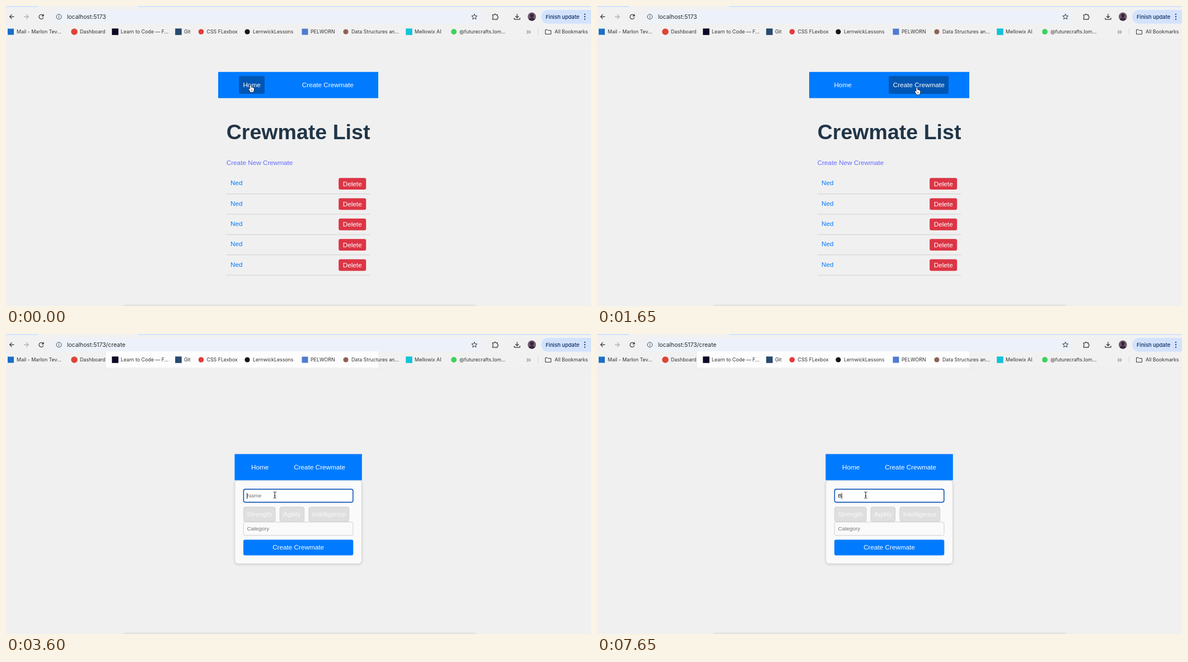
An HTML page with a canvas that plays this animation: 1045 px wide and 536 px high, repeating every 8 s.

```html
<!DOCTYPE html>
<html lang="en">
<head>
<meta charset="utf-8">
<title>Crewmate List</title>
<style>
html, body { margin: 0; width: 100%; height: 100%; overflow: hidden; background: #f0f0f0; }
canvas { display: block; width: 1045px; height: 536px; }
</style>
</head>
<body>
<canvas id="stage"></canvas>
<script>
const W = 1045, H = 536, LOOP = 8000;
const PAGE = '"Liberation Sans", Arial, sans-serif';
const UI = 'Inter, Roboto, sans-serif';
const BLUE = '#007bff', BASE = 11.74, SMALL = 9.78;

const canvas = document.getElementById('stage');
const dpr = window.devicePixelRatio || 1;
canvas.width = W * dpr;
canvas.height = H * dpr;
const ctx = canvas.getContext('2d');

function text(str, x, y, size, color, { font = PAGE, weight = 400, align = 'left' } = {}) {
  ctx.font = `${weight} ${size}px ${font}`;
  ctx.textAlign = align;
  ctx.fillStyle = color;
  ctx.fillText(str, x, y);
}

function rect(x, y, w, h, color) {
  ctx.fillStyle = color;
  ctx.fillRect(x, y, w, h);
}

function box(x, y, w, h, r, fill, stroke, lw = 0.8) {
  ctx.beginPath();
  ctx.roundRect(x, y, w, h, r);
  if (fill) { ctx.fillStyle = fill; ctx.fill(); }
  if (stroke) { ctx.strokeStyle = stroke; ctx.lineWidth = lw; ctx.stroke(); }
}

function disc(x, y, r, color) {
  ctx.beginPath();
  ctx.arc(x, y, r, 0, 7);
  ctx.fillStyle = color;
  ctx.fill();
}

// Stroke an SVG path placed at (x, y)
function line(d, x, y, color = '#333', lw = 1.2, fill) {
  const p = new Path2D(d);
  ctx.save();
  ctx.translate(x, y);
  ctx.lineJoin = 'round';
  ctx.strokeStyle = color;
  ctx.lineWidth = lw;
  ctx.stroke(p);
  if (fill) { ctx.fillStyle = fill; ctx.fill(p); }
  ctx.restore();
}

// label, text x, icon shape, icon centre, icon half size, colour
const bookmarks = [
  ['Mail - Marlon Tev...', 19, 'sq', 8.5, 5.5, '#1a6fc4'],
  ['Dashboard', 132, 'o', 122, 5.8, '#dc4437'],
  ['Learn to Code — F...', 205, 'sq', 195, 5.8, '#0a0a23'],
  ['Git', 318, 'sq', 308, 5.8, '#29496f'],
  ['CSS FLexbox', 358.5, 'o', 348.5, 4.8, '#e33b3b'],
  ['LernwickLessons', 441, 'o', 431, 4.6, '#161616'],
  ['PELWORN', 544, 'sq', 534, 5.5, '#4f7bd0'],
  ['Data Structures an...', 617, 'o', 607, 4.6, '#8d6353'],
  ['Mellowix AI', 730, 'sq', 720, 5.8, '#12c3d8'],
  ['@futurecrafts.lom...', 810, 'o', 800, 5, '#3fd25f']
];

function star(x, y) {
  let d = '';
  for (let i = 0; i < 10; i++) {
    const r = i % 2 ? 2.3 : 5.2, a = i * Math.PI / 5 - Math.PI / 2;
    d += `${i ? 'L' : 'M'}${r * Math.cos(a)} ${r * Math.sin(a)}`;
  }
  line(d + 'Z', x, y, '#333', 1);
}

function toolbar(create) {
  rect(0, 0, W, 61, '#f1f1f1');
  rect(0, 0, W, 2, '#d3e3fd');
  box(57, -6, 179, 9, 3, '#f1f1f1');
  if (create) rect(179, 31, 486, 29.5, '#fdfdfd');
  rect(0, 60.5, W, 0.8, '#e8e8e8');

  line('M4-0H-4M0-4L-4 0L0 4', 10.5, 19.2);
  line('M-4 0H4M0-4L4 0L0 4', 36, 19.2, '#a8a8a8');
  line('M3.6-1.8A4 4 0 1 0 3.9 1.2M4-4.6V-1.4H.8', 63, 19.2);

  box(82, 7.5, 770, 23.5, 11.7, '#edf2fa');
  line('M4.4 0A4.4 4.4 0 1 1-4.4 0A4.4 4.4 0 1 1 4.4 0M0-.6V2.4M0-2.6V-1.5', 94.5, 19.2, '#444', 1);
  text('localhost:5173' + (create ? '/create' : ''), 109, 22.8, 10.35, '#26282b', { font: UI });

  star(836.7, 19.4);
  line('M-4.5-3H-1.6A1.5 1.5 0 0 1 1.4-3H4V-.3A1.5 1.5 0 0 1 4 2.7V5H-4.5V2.4A1.6 1.6 0 0 0-4.5-.6Z', 873.8, 18.8);
  line('M0-5V2M-3-1L0 2.2L3-1M-5 2V4.8H5V2', 913, 19);

  // Avatar
  ctx.save();
  ctx.beginPath();
  ctx.arc(939.3, 19, 7.4, 0, 7);
  ctx.clip();
  rect(931, 11, 17, 17, '#6f5a72');
  disc(939.3, 17, 3.2, '#33262f');
  disc(939.3, 27, 6.4, '#3b2838');
  ctx.restore();

  box(956, 7, 100, 24.5, 12, '#d3e3fd');
  text('Finish update', 964, 22.6, 9.4, '#0a2a5c', { font: UI, weight: 500 });
  for (const y of [14.8, 19.2, 23.6]) disc(1034, y, 1.1, '#0a2a5c');

  for (const [label, x, kind, cx, r, color] of bookmarks) {
    if (kind === 'sq') rect(cx - r, 46 - r, 2 * r, 2 * r, color);
    else disc(cx, 46, r, color);
    text(label, x, 49.3, 8.8, '#333', { font: UI });
  }
  line('M-3.2-2.8L-.4 0L-3.2 2.8M.6-2.8L3.4 0L.6 2.8', 933.5, 46.5, '#333', 1);
  rect(950, 40, 0.8, 12, '#c9d6ea');
  line('M-5-4H-1.5L-.2-2.7H5V4H-5Z', 968.5, 46.3, '#333', 1);
  text('All Bookmarks', 980, 49.3, 8.8, '#333', { font: UI });
}

function nav(x, y, w, homeX, createX, hover) {
  rect(x, y, w, 46.8, BLUE);
  if (hover === 'home') box(homeX - 7.4, y + 7.3, 46, 32, 3, '#0056b3');
  if (hover === 'create') box(createX - 7.6, y + 7.3, 106.8, 32, 3, '#0056b3');
  text('Home', homeX, y + 27.4, BASE, '#fff');
  text('Create Crewmate', createX, y + 27.4, BASE, '#fff');
}

function listPage(hover) {
  nav(379, 117.8, 286, 423.4, 528.8, hover);
  text('Crewmate List', 393.7, 238, 37.57, '#213547', { weight: 700 });
  text('Create New Crewmate', 393.7, 283.6, BASE, '#646cff');
  for (let i = 0; i < 5; i++) {
    const y = 36.33 * i;
    text('Ned', 401, 320.2 + y, BASE, BLUE);
    box(594.2, 307.2 + y, 49, 20.8, 3, '#dc3545');
    text('Delete', 618.7, 321.8 + y, BASE, '#fff', { align: 'center' });
    rect(393.7, 335.2 + y, 256.6, 0.9, '#ccc');
  }
}

function formPage(t) {
  const focus = t >= 3600, typed = t >= 7650;
  ctx.save();
  ctx.shadowColor = 'rgba(0,0,0,.2)';
  ctx.shadowBlur = 4 * dpr;
  ctx.shadowOffsetY = dpr;
  box(408.7, 261.5, 226.8, 149, 6, '#fafafa');
  ctx.restore();
  box(408.9, 261.7, 226.4, 148.6, 6, null, '#d4d4d4', 0.7);
  nav(408.4, 214.5, 227.4, 438, 514.2);

  if (focus) box(424.4, 277.4, 195.4, 23.2, 3, '#fff', '#1257b8', 1.6);
  else box(424.2, 277.2, 195.8, 24, 3, '#fafafa', '#c6c6c6');
  text(typed ? 'B' : 'Name', 430.4, 292.4, SMALL, typed ? '#111' : '#757575');

  const tags = [['Strength', 424, 57.4], ['Agility', 488.8, 44.2], ['Intelligence', 540.6, 72.4]];
  for (const [label, x, w] of tags) {
    box(x + 0.4, 309.2, w - 0.8, 25.8, 3, '#dfdfdf', '#c8c8c8');
    text(label, x + w / 2, 326.4, BASE, '#f8f8f8', { align: 'center' });
  }
  box(424.2, 336, 195.8, 23.8, 3, '#fafafa', '#c6c6c6');
  text('Category', 430.4, 351.3, SMALL, '#757575');
  box(424, 367.4, 196.3, 28.2, 3, BLUE);
  text('Create Crewmate', 522.1, 385.4, BASE, '#fff', { align: 'center' });

  // Caret toggles at each of these times
  const blinks = [3600, 4050, 4500, 5100, 5550, 6000, 6600, 7050, 7500];
  if (blinks.filter(b => t >= b).length % 2) rect(typed ? 436.8 : 430.2, 284, 0.9, 10.8, '#111');
}

const cursors = {
  arrow(x, y) {
    const d = 'M0 0V10.4L2.4 8.2L4.1 12.2L6 11.4L4.3 7.5H7.6Z';
    line(d, x, y, '#fff', 1.5, '#000');
  },
  hand(x, y) {
    line('M-1 1.2C-1-.3 1-.3 1 1.2V4.2C1.3 3.4 2.7 3.5 2.8 4.5C3.3 3.8 4.4 4 4.5 5C5 4.5 6 4.9 6 5.8V8.4C6 10 4.9 10.5 4.8 12.2H-.8C-1.2 10.2-2.6 9-3.4 7.3C-3.8 6.2-2.6 5.7-1.9 6.5L-1 7.5Z',
      x, y, '#000', 1.3, '#fff');
    line('M1 7.8V10.3M2.7 7.8V10.3', x, y, '#000', 0.6);
  },
  beam(x, y) {
    const d = 'M-2.6-5.6C-1-5.6 0-5.2 0-4.2C0-5.2 1-5.6 2.6-5.6M0-4.2V4.2M-2.6 5.6C-1 5.6 0 5.2 0 4.2C0 5.2 1 5.6 2.6 5.6M-1.3 1.6H1.3';
    line(d, x, y, '#fff', 2);
    line(d, x, y, '#111', 1);
  }
};

// start time, cursor, hotspot x, y
const moves = [
  [0, 'hand', 437, 141.5],
  [1200, 'arrow', 461.8, 186.6],
  [1350, 'arrow', 550.8, 258.8],
  [1500, 'arrow', 643.6, 191],
  [1650, 'hand', 571.4, 146],
  [2250, 'arrow', 571.2, 145.6],
  [2700, 'arrow', 560, 157],
  [2850, 'arrow', 524.2, 209],
  [3000, 'arrow', 479.8, 275],
  [3150, 'beam', 480, 287],
  [3300, 'beam', 480, 287.6],
  [3450, 'beam', 480.7, 288],
  [3600, 'beam', 480.2, 287.6],
  [3900, 'beam', 480, 287.8]
];

function draw(t) {
  ctx.setTransform(dpr, 0, 0, dpr, 0, 0);
  rect(0, 0, W, H, '#f0f0f0');
  const create = t >= 2250;
  toolbar(create);
  if (create) formPage(t);
  else listPage(t < 1200 ? 'home' : t >= 1650 ? 'create' : '');
  box(200, 533, 648, 30, 16, '#e4e4e4');
  const [, kind, x, y] = moves.filter(m => t >= m[0]).pop();
  cursors[kind](x, y);
}

const start = performance.now();
function tick() {
  draw((performance.now() - start) % LOOP);
  requestAnimationFrame(tick);
}
tick();
</script>
</body>
</html>
```
